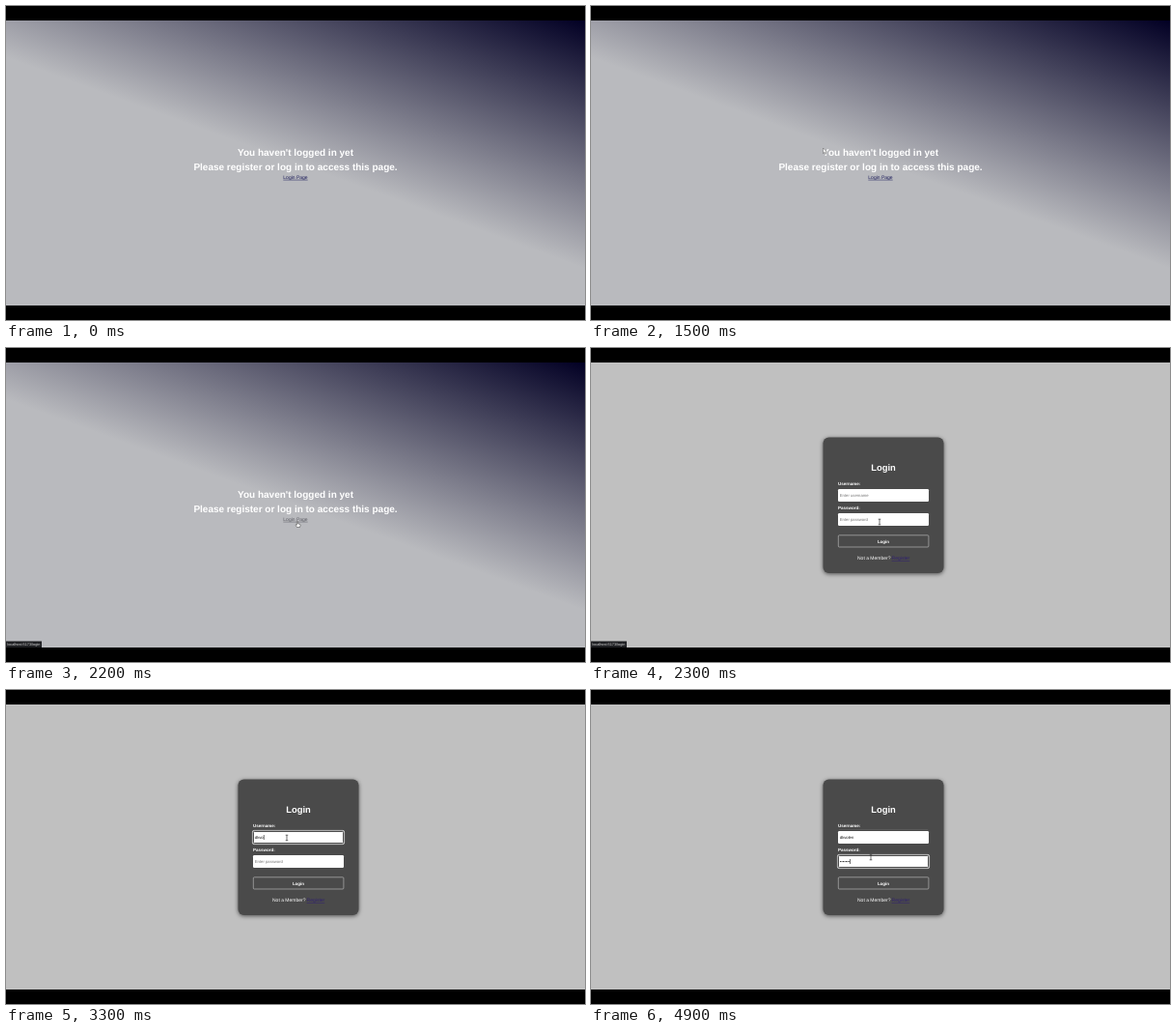
Write an HTML page that moves like this. It is 600x325 px and loops after 5 s.

```html
<!DOCTYPE html>
<html lang="en">
<head>
<meta charset="utf-8">
<style>
  html, body { margin: 0; height: 100%; overflow: hidden; background: #000; }
  #stage { position: relative; width: 600px; height: 325px; overflow: hidden; background: #000; }
  .bg { position: absolute; top: 15px; width: 600px; height: 295px; }
  #homeBg { background: linear-gradient(20deg, #b9babe 50%, #020024 100%); }
  #loginBg { background: #c0c0c0; }
  svg { position: absolute; left: 0; top: 0; }
  text { font: 5px "Liberation Sans", Arial, sans-serif; text-rendering: geometricPrecision; fill: #fff; }
  .mid { text-anchor: middle; }
  .h { font-size: 10px; font-weight: bold; }
  .b { font-size: 4.5px; font-weight: bold; }
  .link { text-decoration: underline; }
  .field text { font-size: 4.2px; }
  #card { filter: drop-shadow(0 1px 2px #0009); }
</style>
</head>
<body>
<div id="stage">
  <div class="bg" id="homeBg"></div>
  <div class="bg" id="loginBg"></div>
  <svg width="600" height="325">
    <g id="home">
      <text class="h mid" x="300" y="154.6">You haven't logged in yet</text>
      <text class="h mid" x="300" y="169.8">Please register or log in to access this page.</text>
      <text class="mid link" id="homeLink" x="300" y="178.8">Login Page</text>
    </g>
    <g id="login">
      <rect id="card" x="240.5" y="92.5" width="125" height="140.5" rx="6" fill="#4a4a4a"/>
      <text class="h mid" x="303" y="126.7" style="font-size:9.4px">Login</text>
      <text class="b" x="256" y="141.8">Username:</text>
      <text class="b" x="256" y="167.2">Password:</text>
      <g class="field" id="user" transform="translate(256 146)"></g>
      <g class="field" id="pass" transform="translate(256 171)"></g>
      <rect x="256.3" y="193.8" width="93.6" height="12.2" rx="1" fill="none" stroke="#c4c4c4" stroke-width=".6"/>
      <text class="b mid" x="303" y="201.5">Login</text>
      <text x="276" y="219.4">Not a Member?</text>
      <text class="link" x="311.6" y="219.4" style="fill:#302070">Register</text>
    </g>
    <g id="status">
      <rect y="303.5" width="37" height="6.5" fill="#1f2023"/>
      <text x="1.3" y="308.3" style="font-size:3.85px;fill:#d8d8d8">localhost:5173/login</text>
    </g>
    <g id="cursor" stroke-linejoin="round">
      <path id="arrow" d="M0 0V5.6L1.3 4.5 2.2 6.4 3 6 2.2 4.2H4Z" fill="#fff" stroke="#555" stroke-width=".5"/>
      <path id="hand" d="M-.6 .2Q0-.5.6.2V2.4L2.6 2.9Q3.2 3.1 3 4L2.5 6H-.5L-2 3.7Q-1.8 2.9-.6 3.8Z" fill="#fff" stroke="#333" stroke-width=".5"/>
      <path id="beam" d="M-1.3-2.8H1.3M0-2.8V2.8M-1.3 2.8H1.3" fill="none" stroke="#333" stroke-width=".7"/>
    </g>
  </svg>
</div>
<script>
const $ = id => document.getElementById(id);
const show = (id, on) => $(id).style.display = on ? '' : 'none';
const USER = 'dkvolen';

// pointer track: time, x, y
const track = [
  [100, 120, 185], [300, 275, 152], [400, 335, 148], [600, 302, 178],
  [700, 300, 177], [900, 268, 140], [1000, 266, 136], [1200, 305, 170],
  [1300, 298, 171], [1500, 240.5, 147], [1600, 270, 146], [1800, 340, 172],
  [2000, 312, 181], [2200, 302, 179.5], [2300, 299, 180], [2400, 299, 180],
  [2600, 294, 128], [2800, 291, 153], [3600, 291, 153], [3800, 290, 173], [5000, 290, 173]
];

function pointer(t) {
  const i = Math.max(1, track.findIndex(k => k[0] >= t));
  const [t0, x0, y0] = track[i - 1], [t1, x1, y1] = track[i];
  const p = Math.max(0, (t - t0) / (t1 - t0));
  return [x0 + (x1 - x0) * p, y0 + (y1 - y0) * p];
}

// empty fields show the hint; focus adds a double ring and a caret
function field(id, value, hint, focus) {
  const g = $(id);
  g.innerHTML = `
    <rect width="94" height="13" rx="1.2" fill="#fff"/>
    ${focus ? `<rect x="-.6" y="-.6" width="95.2" height="14.2" rx="1.5" fill="none" stroke="#e8e8e8" stroke-width=".8"/>
    <rect x=".4" y=".4" width="93.2" height="12.2" rx="1" fill="none" stroke="#222" stroke-width=".9"/>` : ''}
    <text x="1.8" y="7.9" style="fill:${value ? '#111' : '#777'}">${value || hint}</text>`;
  if (!focus) return;
  const x = 2 + (value ? g.querySelector('text').getComputedTextLength() : 0);
  g.innerHTML += `<rect x="${x}" y="4" width=".6" height="5" fill="#111"/>`;
}

const typed = (t, start) => Math.max(0, Math.min(7, Math.floor((t - start) / 100)));

function draw(now) {
  const t = Math.floor(now % 5000 / 100) * 100;
  const login = t >= 2300;
  const [x, y] = pointer(t);
  const over = !login && x > 287 && x < 313 && y > 172 && y < 183;

  for (const id of ['home', 'homeBg']) show(id, !login);
  for (const id of ['login', 'loginBg']) show(id, login);
  show('status', t >= 2000 && t < 2600);
  $('homeLink').style.fill = over ? '#5c5c64' : '#1c1c5a';

  if (login) {
    field('user', USER.slice(0, typed(t, 2900)), 'Enter username', t >= 2800 && t < 3800);
    field('pass', '•'.repeat(typed(t, 4200)), 'Enter password', t >= 3800);
  }

  show('cursor', t >= 100);
  $('cursor').setAttribute('transform', `translate(${x} ${y})`);
  show('arrow', !login && !over);
  show('hand', over);
  show('beam', login);
}

const start = performance.now();
function loop() {
  draw(performance.now() - start);
  requestAnimationFrame(loop);
}
loop();
</script>
</body>
</html>
```
